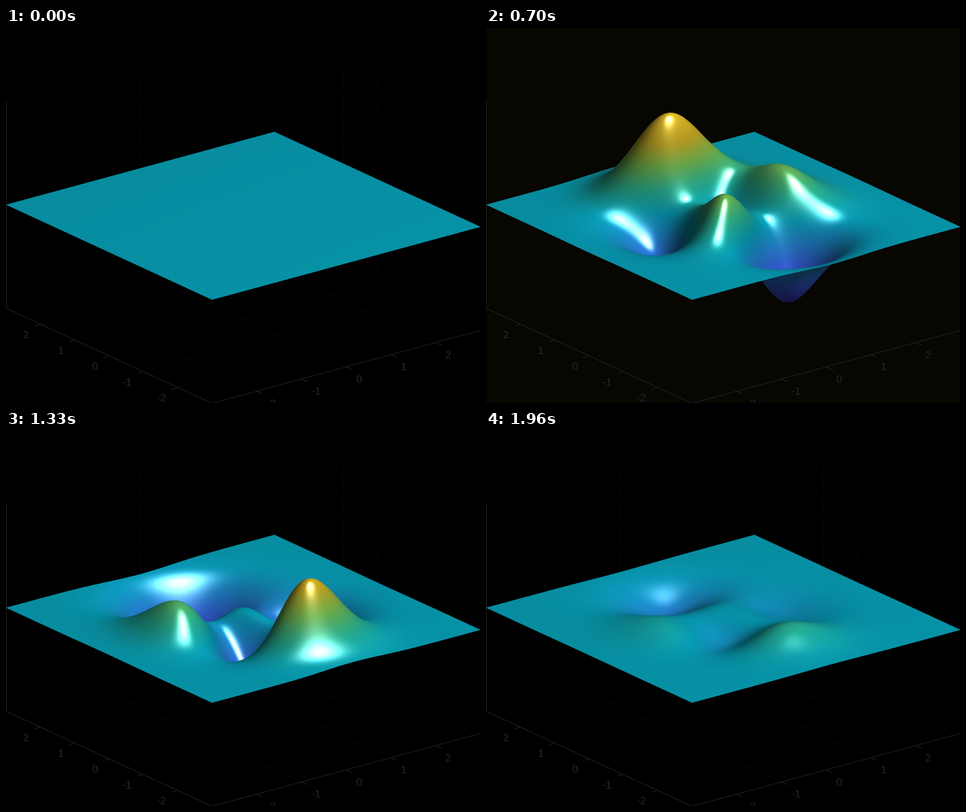
A matplotlib script for the animation above (2030 ms loop, 842 by 665 pixels).

```python
import numpy as np
import matplotlib.pyplot as plt
from matplotlib.animation import FuncAnimation
from matplotlib.colors import LinearSegmentedColormap

W, H, DPI = 842, 665, 100
FRAMES, STEP = 29, 70
SS = 2            # supersampling
DEPTHS = 4800     # depth samples per screen column

# Orthographic view of a 6 x 6 x 18 box stretched to fill the stage
AZ, EL = np.radians(37.5), np.radians(30)
C, S = np.cos(AZ), np.sin(AZ)
KX = W / (6 * (C + S))
CUBE = H / ((C + S) * np.sin(EL) + np.cos(EL))
KD, KZ = np.sin(EL) * CUBE / 6, np.cos(EL) * CUBE / 18
CX, CY = (W + 1) / 2, (H + 1) / 2

# Camera frame, and a local light 30 degrees right of and above the camera
VIEW = np.array([-S * np.cos(EL), -C * np.cos(EL), np.sin(EL)])
RIGHT = np.array([C, -S, 0])
UP = np.cross(VIEW, RIGHT)
TURN = np.radians(30)
LIGHT = 9.57 * (np.cos(TURN) * (np.sin(TURN) * RIGHT + np.cos(TURN) * VIEW)
                + np.sin(TURN) * UP)
AMBIENT, DIFFUSE, SPECULAR, SHINE = 0.3, 0.6, 0.9, 10

Z_MIN, Z_MAX = -6.55, 8.08
PARULA = LinearSegmentedColormap.from_list("parula", [
    "#3e26a8", "#4747eb", "#3e6fff", "#2797eb", "#08b5d0",
    "#31c69f", "#81cc59", "#dcbd29", "#fccf30", "#f9fb15"])
LUT = PARULA(np.linspace(0, 1, 1024))[:, :3].astype(np.float32)


def project(x, y, z):
    return (CX + KX * (C * x - S * y),
            CY - KD * (S * x + C * y) - KZ * z)


def peaks(x, y):
    """Height of the peaks function and its two slopes."""
    e1 = np.exp(-x**2 - (y + 1)**2)
    e2 = np.exp(-x**2 - y**2)
    e3 = np.exp(-(x + 1)**2 - y**2) / 3
    q = 1 - x
    f = x / 5 - x**3 - y**5
    z = 3 * q**2 * e1 - 10 * f * e2 - e3
    zx = (-6 * q * (1 + x * q) * e1 - 10 * (0.2 - 3 * x**2 - 2 * x * f) * e2
          + 2 * (x + 1) * e3)
    zy = (-6 * q**2 * (y + 1) * e1 + 10 * (5 * y**4 + 2 * y * f) * e2
          + 2 * y * e3)
    return z, zx, zy


def sample_surface():
    """Points of the surface ordered from far to near."""
    u = (((np.arange(W * SS) + 0.5) / SS - CX) / KX).astype(np.float32)
    reach = 3 * (C + S)
    w = np.linspace(reach, -reach, DEPTHS, dtype=np.float32)[:, None]
    x = np.float32(C) * u + np.float32(S) * w
    y = np.float32(C) * w - np.float32(S) * u
    inside = (abs(x) <= 3) & (abs(y) <= 3)
    col = np.nonzero(inside)[1].astype(np.int32)
    return x[inside], y[inside], col


PX, PY, COL = sample_surface()
PZ, ZX, ZY = peaks(PX, PY)
ROW0 = (SS * project(PX, PY, 0)[1]).astype(np.float32)
LIFT = (SS * KZ * PZ).astype(np.float32)
ORDER = np.arange(PX.size, dtype=np.int32)


def shade(i, amp):
    z = amp * PZ[i]
    nx, ny = -amp / 3 * ZX[i], -amp / 3 * ZY[i]
    inv = 1 / np.sqrt(nx * nx + ny * ny + 1)
    nv = (nx * VIEW[0] + ny * VIEW[1] + VIEW[2]) * inv
    lx, ly, lz = LIGHT[0] - PX[i] / 6, LIGHT[1] - PY[i] / 6, LIGHT[2] - z / 18
    dist = 1 / np.sqrt(lx * lx + ly * ly + lz * lz)
    nl = (nx * lx + ny * ly + lz) * inv * dist
    nl = np.where(nv < 0, -nl, nl)      # light back faces as front faces
    lv = (lx * VIEW[0] + ly * VIEW[1] + lz * VIEW[2]) * dist
    shine = np.where(nl > 0, np.maximum(2 * nl * abs(nv) - lv, 0), 0) ** SHINE
    level = (z - Z_MIN) / (Z_MAX - Z_MIN) * (len(LUT) - 1)
    base = LUT[np.clip(level, 0, len(LUT) - 1).astype(np.int32)]
    lit = AMBIENT + DIFFUSE * np.maximum(nl, 0)
    return np.clip(base * lit[:, None] + SPECULAR * shine[:, None], 0, 1)


def render(amp):
    row = (ROW0 - np.float32(amp) * LIFT).astype(np.int32)
    front = np.full(W * H * SS * SS, -1, np.int32)
    front[row * (W * SS) + COL] = ORDER     # nearer points overwrite
    seen = np.flatnonzero(front >= 0)
    fine = np.zeros((front.size, 4), np.float32)
    fine[seen, :3] = shade(front[seen], np.float32(amp))
    fine[seen, 3] = 1
    fine = fine.reshape(H * SS, W * SS, 4)
    img = sum(fine[a::SS, b::SS] for a in range(SS) for b in range(SS)) / SS**2
    img[..., :3] /= np.maximum(img[..., 3:], 1e-6)
    return (img * 255 + 0.5).astype(np.uint8)


fig = plt.figure(figsize=(W / DPI, H / DPI), dpi=DPI, facecolor="black")
ax = fig.add_axes([0, 0, 1, 1])
ax.set_axis_off()
PIXEL = 72 / DPI
INK, FAINT = "#262626", "#070707"


def line(points, color):
    xs, ys = zip(*(project(*p) for p in points))
    ax.plot(xs, ys, color=color, lw=PIXEL, zorder=1)


def label(x, y, value, align):
    ax.text(x, y, str(value), color=INK, family="Liberation Sans",
            size=19.5 * PIXEL, ha=align, va="baseline", zorder=3)


for t in range(-2, 3):
    line([(t, -3, -9), (t, 3, -9), (t, 3, 9)], FAINT)
    line([(-3, t, -9), (3, t, -9), (3, t, 9)], FAINT)
for t in range(-8, 9, 2):
    line([(-3, 3, t), (3, 3, t), (3, -3, t)], FAINT)
line([(3, 3, -9), (3, 3, 9)], FAINT)

line([(-3, 3, 9), (-3, 3, -9), (-3, -3, -9), (3, -3, -9)], INK)
for t in range(-2, 3):
    line([(-3, t, -9), (-3.13, t, -9)], INK)
    line([(t, -3, -9), (t, -3.17, -9)], INK)
    x, y = project(-3, t, -9)
    label(x - 20.3, y + 25, t, "right")
    x, y = project(t, -3, -9)
    label(x + 17, y + 28, t, "left")

surface = ax.imshow(np.zeros((H, W, 4), np.uint8), extent=(0, W, H, 0),
                    interpolation="nearest", aspect="auto", zorder=2)
ax.set_xlim(0, W)
ax.set_ylim(H, 0)


def update(k):
    amp = np.sin(2 * np.pi * k / FRAMES)
    surface.set_data(render(amp))
    fig.set_facecolor("#080600" if amp > 0.4 else "black")
    return [surface]


anim = FuncAnimation(fig, update, frames=FRAMES, interval=STEP, repeat=True,
                     repeat_delay=0, init_func=lambda: [surface], blit=False)
plt.show()
```
